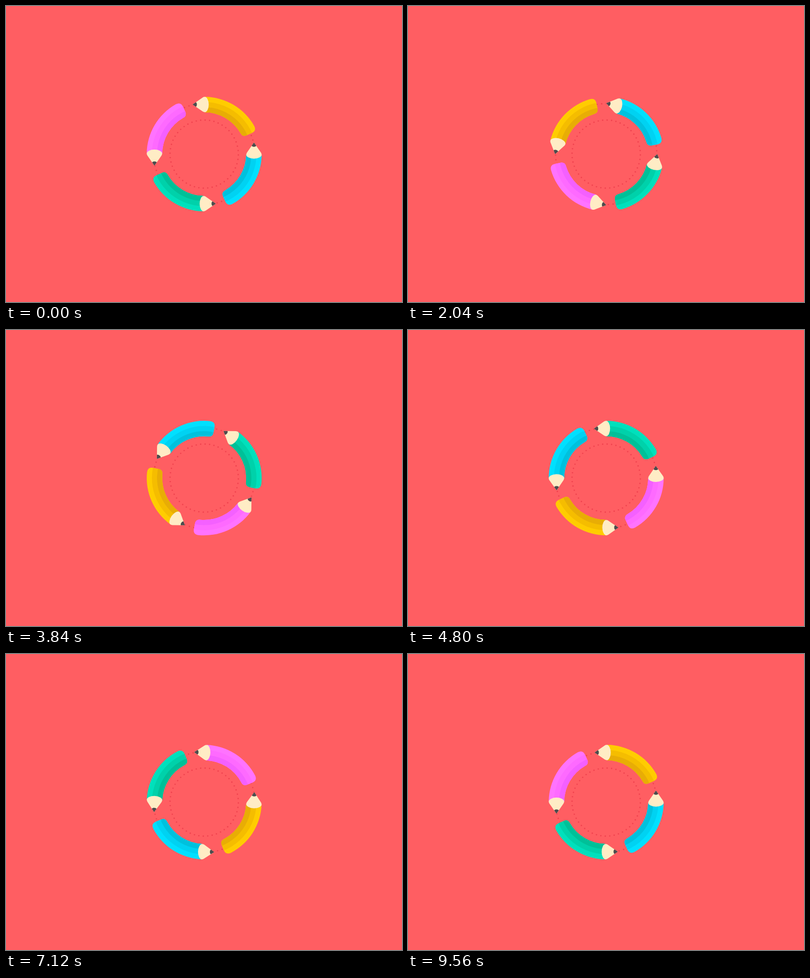
These frames come from a looping animation (800x600 px, 9.6 s). An HTML page with a canvas:

```html
<!DOCTYPE html>
<html lang="en">
<head>
<meta charset="utf-8">
<title>Pencil ring</title>
<style>
html, body { margin: 0; width: 100%; height: 100%; overflow: hidden; background: #ff5e62; }
canvas { display: block; width: 800px; height: 600px; }
</style>
</head>
<body>
<canvas id="stage" width="800" height="600"></canvas>
<script>
const ctx = document.getElementById('stage').getContext('2d');
const TAU = Math.PI * 2;
const LOOP = 9600, STEP = 40, TURN_STEPS = 239;
const OUTER = 116.1, INNER = 84.9, MIDDLE = (OUTER + INNER) / 2;
const TAIL = -24 * Math.PI / 180;

// Band colours run from the outer rim to the inner rim.
const PENCILS = [
  ['#ffcc00', '#f5bd00', '#e8ad05'],
  ['#ff73ff', '#fe6aff', '#f460ff'],
  ['#00e0bc', '#00d1aa', '#00c098'],
  ['#00e0ff', '#00d2f2', '#00c1dd']
];

const polar = (r, a) => [r * Math.cos(a), r * Math.sin(a)];

function dotRing(radius, count, turn) {
  ctx.fillStyle = '#f0434f';
  for (let i = 0; i < count; i++) {
    const [x, y] = polar(radius, turn + i * TAU / count);
    ctx.beginPath();
    ctx.arc(x, y, 1.45, 0, TAU);
    ctx.fill();
  }
}

function bodyPath() {
  const start = -Math.PI / 2 + 0.013;
  const big = 11, small = 9;
  ctx.beginPath();
  ctx.arc(0, 0, OUTER, start, TAIL - big / OUTER);
  ctx.quadraticCurveTo(...polar(OUTER, TAIL), ...polar(OUTER - big, TAIL));
  ctx.lineTo(...polar(INNER + small, TAIL));
  ctx.quadraticCurveTo(...polar(INNER, TAIL), ...polar(INNER, TAIL - small / INNER));
  ctx.arc(0, 0, INNER, TAIL - small / INNER, start, true);
  ctx.closePath();
}

function tip() {
  const apex = -23.5, half = (OUTER - INNER) / 2;
  ctx.save();
  ctx.translate(0, -MIDDLE);

  ctx.fillStyle = '#ffecc5';
  ctx.beginPath();
  ctx.ellipse(1, 0, 8.2, half, 0, -Math.PI / 2, Math.PI / 2);
  ctx.arcTo(-1, half, apex, 0, 8);
  ctx.lineTo(apex, 0);
  ctx.arcTo(-1, -half, 1, -half, 8);
  ctx.fill();

  ctx.fillStyle = '#4d4b4d';
  ctx.beginPath();
  ctx.moveTo(apex, 0);
  ctx.lineTo(apex + 6.6, -4.6);
  ctx.bezierCurveTo(apex + 9.4, -3.4, apex + 9.4, 3.4, apex + 6.6, 4.6);
  ctx.fill();
  ctx.restore();
}

function pencil(colors, turn) {
  const band = (OUTER - INNER) / 3;
  ctx.save();
  ctx.rotate(turn);
  bodyPath();
  ctx.fillStyle = colors[0];
  ctx.fill();
  ctx.save();
  ctx.clip();
  for (const i of [1, 2]) {
    ctx.fillStyle = colors[i];
    ctx.beginPath();
    ctx.arc(0, 0, OUTER - i * band, 0, TAU);
    ctx.fill();
  }
  ctx.restore();
  tip();
  ctx.restore();
}

function draw() {
  const step = Math.floor(performance.now() % LOOP / STEP);
  const turn = step / TURN_STEPS * TAU;
  ctx.fillStyle = '#ff5e62';
  ctx.fillRect(0, 0, 800, 600);
  ctx.save();
  ctx.translate(400.4, 300.2);
  dotRing(69, 48, 0.027);
  dotRing(102.3, 67, turn);
  PENCILS.forEach((colors, i) => pencil(colors, -turn - i * TAU / 4));
  ctx.restore();
  requestAnimationFrame(draw);
}
draw();
</script>
</body>
</html>
```
